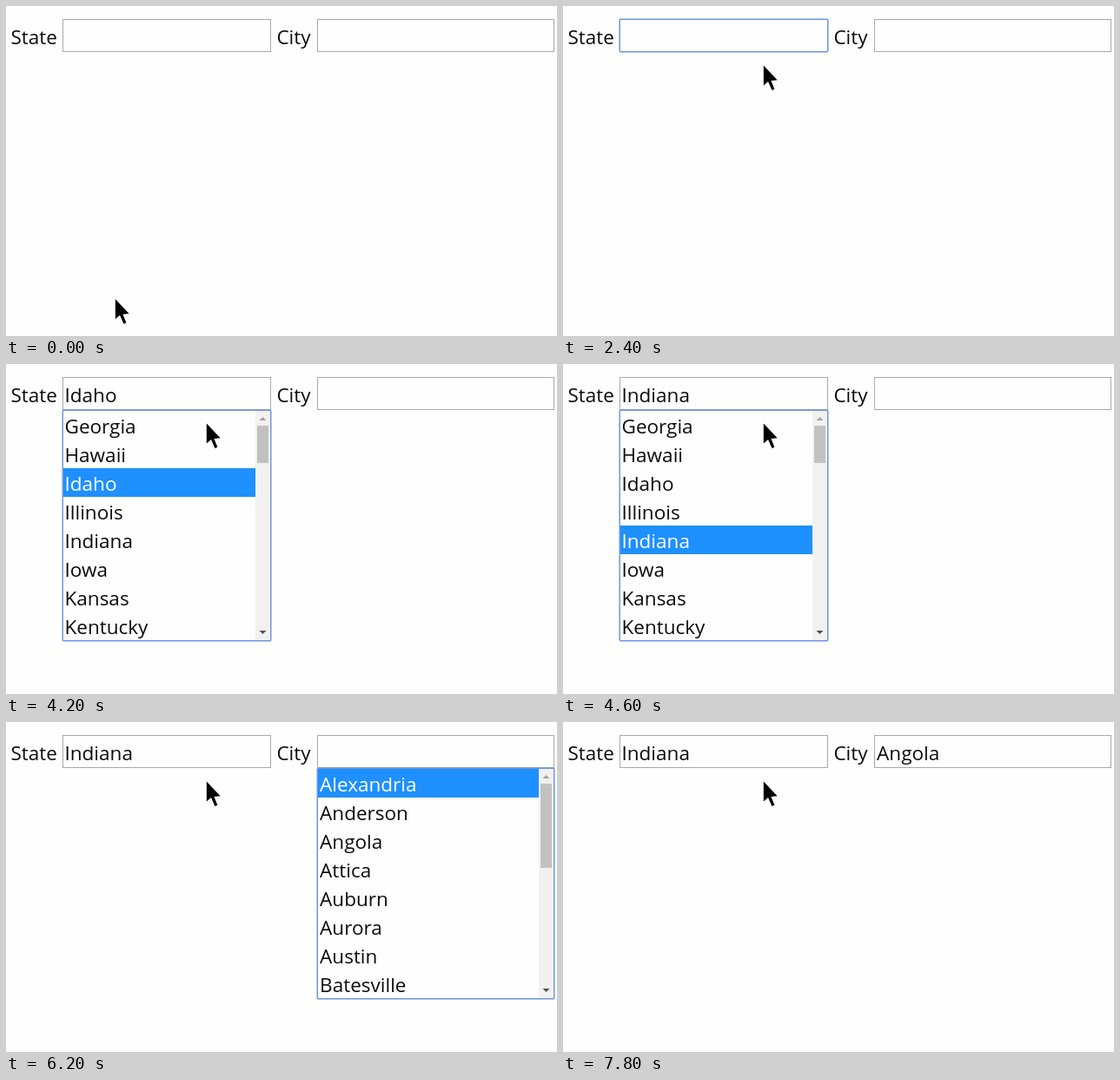
An HTML page with a canvas that plays this animation: 634x380 px, repeating every 8000 ms.

```html
<!DOCTYPE html>
<html lang="en">
<head>
<meta charset="utf-8">
<title>State and city picker</title>
<style>
html, body { margin: 0; width: 100%; height: 100%; overflow: hidden; background: #fefefd; }
canvas { display: block; }
</style>
</head>
<body>
<canvas id="stage" width="634" height="380"></canvas>
<script>
const ctx = document.getElementById('stage').getContext('2d');
const LOOP = 8000, STEP = 200, ROW = 33;
const BACK = '#fefefd', INK = '#0c0c0c', GREY = '#a9a9a9', RING = '#6d97de', PICK = '#1e90ff';

const state = {
  label: 'State', labelX: 5.4, x: 65, w: 240, textX: 67.5, thumb: 43,
  items: ['Georgia', 'Hawaii', 'Idaho', 'Illinois', 'Indiana', 'Iowa', 'Kansas', 'Kentucky']
};
const city = {
  label: 'City', labelX: 311.4, x: 358, w: 273, textX: 361.1, thumb: 97,
  items: ['Alexandria', 'Anderson', 'Angola', 'Attica', 'Auburn', 'Aurora', 'Austin', 'Batesville']
};

function box(x, y, w, h, color) {
  ctx.fillStyle = color;
  ctx.fillRect(x, y, w, h);
}

function frame(x, y, w, h, color) {
  ctx.strokeStyle = color;
  ctx.lineWidth = 1;
  ctx.strokeRect(x + 0.5, y + 0.5, w - 1, h - 1);
}

function ring(x, y, w, h) {
  ctx.strokeStyle = RING;
  ctx.lineWidth = 1.5;
  ctx.beginPath();
  ctx.roundRect(x + 0.25, y + 0.25, w - 0.5, h - 0.5, 1);
  ctx.stroke();
}

function text(str, x, y, color = INK) {
  ctx.fillStyle = color;
  ctx.fillText(str, x, y);
}

function poly(points, color) {
  ctx.beginPath();
  points.forEach(([x, y]) => ctx.lineTo(x, y));
  ctx.closePath();
  ctx.fillStyle = color;
  ctx.fill();
}

function drawField(f, value, focused) {
  text(f.label, f.labelX, 44);
  frame(f.x, 15, f.w, 38, GREY);
  if (focused) ring(f.x, 15, f.w, 38);
  text(value, f.textX, 44);
}

function drawList(f, picked, focused) {
  const right = f.x + f.w, bar = right - 18, mid = bar + 8.5;
  box(f.x, 53, f.w, 266, BACK);
  if (focused) ring(f.x, 53, f.w, 266);
  else frame(f.x, 53, f.w, 266, GREY);
  f.items.forEach((name, i) => {
    const on = i === picked;
    if (on) box(f.x + 1, 54 + i * ROW, f.w - 19, ROW, PICK);
    text(name, f.textX, 80 + i * ROW, on ? '#fff' : INK);
  });
  box(bar, 54, 17, 264, '#f1f1f1');
  box(bar + 2, 71, 13, f.thumb, '#c1c1c1');
  poly([[mid - 4, 65], [mid, 61], [mid + 4, 65]], '#a3a3a3');
  poly([[mid - 4, 307], [mid, 311], [mid + 4, 307]], '#505050');
}

const ease = p => p * p * (3 - 2 * p);
const part = (t, a, b) => ease(Math.min(1, Math.max(0, (t - a) / (b - a))));

function drawPointer(t) {
  const go = part(t, 0, 1000), back = part(t, 1000, 1200);
  const x = 126 + 97 * go + 8 * back;
  const y = 338 - 300 * go + 31 * back;
  ctx.save();
  ctx.translate(x - 0.2, y - 0.4);
  ctx.beginPath();
  [[0, 0], [0, 23], [5.2, 18.4], [9.6, 28.5], [12.6, 27.2], [8.6, 17.4], [15.8, 16.6]]
    .forEach(([px, py]) => ctx.lineTo(px, py));
  ctx.closePath();
  ctx.lineJoin = 'miter';
  ctx.lineWidth = 2;
  ctx.strokeStyle = '#fff';
  ctx.stroke();
  ctx.fillStyle = '#000';
  ctx.fill();
  ctx.restore();
}

// Index of the highlighted row, moving one row per step up to last.
const pickAt = (t, first, last) => Math.min(last, Math.floor((t - first) / STEP));

function draw(time) {
  const t = Math.floor(time / STEP) * STEP;
  box(0, 0, 634, 380, BACK);
  ctx.font = '22.5px "Open Sans", "Noto Sans", sans-serif';

  const statePick = t < 3400 ? -1 : t < 4000 ? 0 : pickAt(t, 3800, 4);
  const cityPick = t < 6200 ? -1 : pickAt(t, 6200, 2);
  const stateText = t < 2800 ? '' : statePick < 1 ? 'g' : state.items[statePick];
  const cityText = cityPick < 1 ? '' : city.items[cityPick];

  drawField(state, stateText, t >= 1000 && t < 3400);
  drawField(city, cityText, false);
  if (t >= 2800 && t < 5200) drawList(state, statePick, t >= 3400);
  if (t >= 5200 && t < 7600) drawList(city, cityPick, true);
  drawPointer(t);
}

const start = performance.now();
function tick() {
  draw((performance.now() - start) % LOOP);
  requestAnimationFrame(tick);
}
tick();
</script>
</body>
</html>
```
